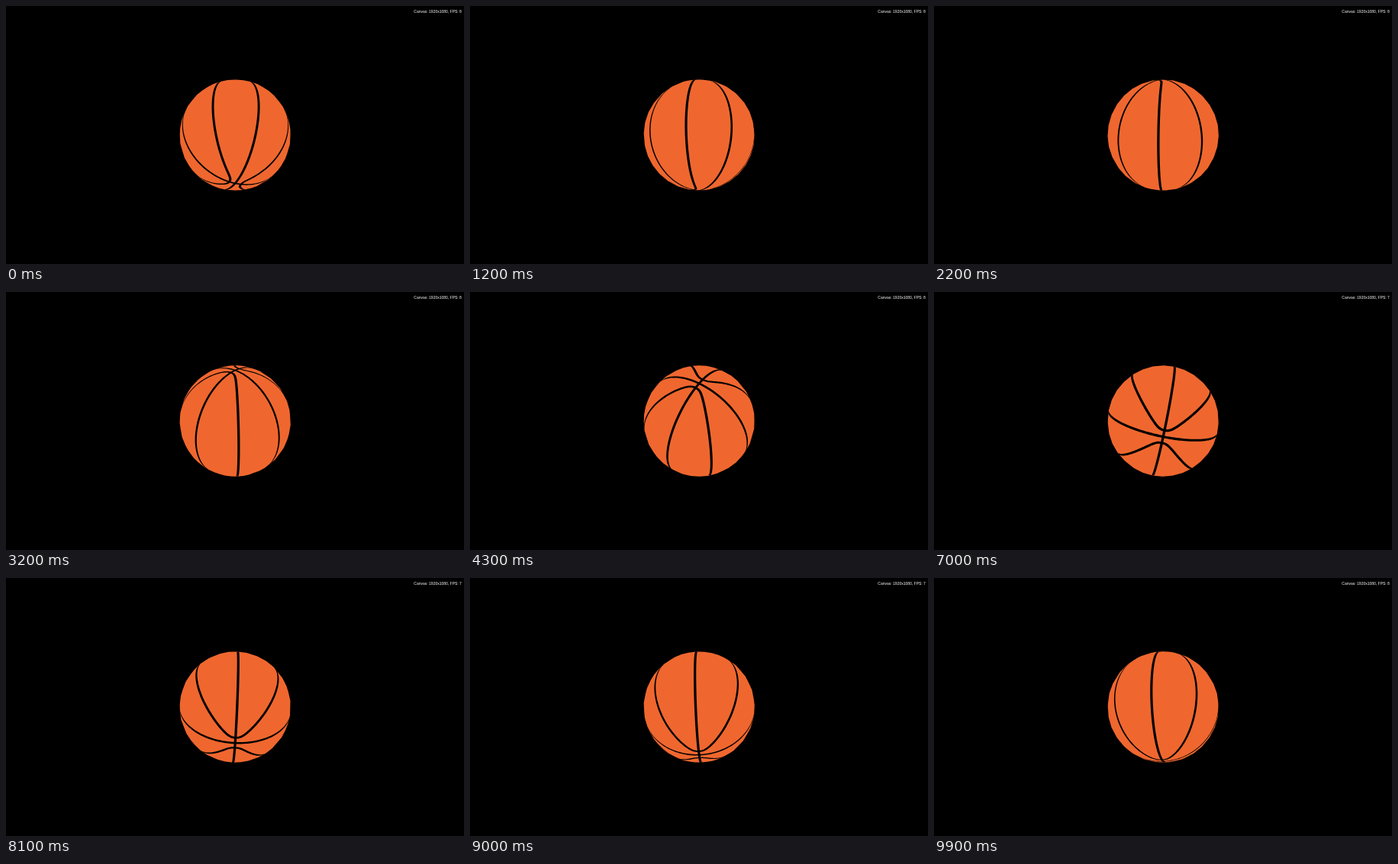
An HTML page with a canvas for the animation above (10000 ms loop, 600 by 338 pixels).

```html
<!DOCTYPE html>
<html lang="en">
<head>
<meta charset="utf-8">
<title>Basketball</title>
<style>
  html, body { margin: 0; width: 100%; height: 100%; overflow: hidden; background: #000; }
  canvas { display: block; }
</style>
</head>
<body>
<canvas id="stage" width="600" height="338"></canvas>
<script>
const ctx = document.getElementById('stage').getContext('2d');
const { PI, sin, cos, acos, min, sign, hypot } = Math;
const RAD = PI / 180;
const CX = 300.2, CY = 169, RADIUS = 72.4;
const DEPTH = 0.1;            // ball radius / camera distance
const HALF_SEAM = 0.0205;     // seam half-width on the unit sphere
const HOOK = 6.3 * RAD;       // closest approach of a looped seam to the pole
const LON = 32, LAT = 16, STEPS = 240;

let tilt, spin;

// Unit vector for polar angle and azimuth around the tilted axis (y down, z to viewer).
function onBall(polar, azimuth) {
  const c = cos(polar), s = sin(polar), f = azimuth + spin;
  const e = s * sin(f);
  return [s * cos(f), c * sin(tilt) + e * cos(tilt), c * cos(tilt) - e * sin(tilt)];
}

function project([x, y, z]) {
  const k = RADIUS / (1 - DEPTH * z);
  return [CX + x * k, CY + y * k];
}

function addQuad(...corners) {
  corners.forEach((p, i) => ctx[i ? 'lineTo' : 'moveTo'](...project(p)));
  ctx.closePath();
}

function drawBall() {
  ctx.beginPath();
  const dLat = PI / LAT, dLon = 2 * PI / LON;
  for (let i = 0; i < LAT; i++) {
    for (let j = 0; j < LON; j++) {
      const v = i * dLat, u = j * dLon;
      if (onBall(v + dLat / 2, u + dLon / 2)[2] < DEPTH) continue;
      addQuad(onBall(v, u), onBall(v + dLat, u),
              onBall(v + dLat, u + dLon), onBall(v, u + dLon));
    }
  }
  ctx.fillStyle = '#ef672f';
  ctx.fill();
}

const meridian = azimuth => s => onBall(s, azimuth);

// Follows two meridians 90 degrees apart, joined by a tight bend near each pole.
const loop = azimuth => s => {
  const polar = PI / 2 - (PI / 2 - HOOK) * cos(s);
  const ratio = min(1, HOOK / min(polar, PI - polar));
  return onBall(polar, azimuth + sign(sin(s)) * acos(ratio ** 3) / 2);
};

const seams = [meridian(0), meridian(PI / 2), loop(0), loop(PI)];

// Point on a seam with its two edges.
function section(curve, s) {
  const p = curve(s), a = curve(s - 0.002), b = curve(s + 0.002);
  const [dx, dy, dz] = b.map((v, i) => v - a[i]);
  const side = [p[1] * dz - p[2] * dy, p[2] * dx - p[0] * dz, p[0] * dy - p[1] * dx];
  const k = HALF_SEAM / hypot(...side);
  return {
    z: p[2],
    left: p.map((v, i) => v + side[i] * k),
    right: p.map((v, i) => v - side[i] * k)
  };
}

function drawSeams() {
  ctx.beginPath();
  for (const curve of seams) {
    let prev = section(curve, 0);
    for (let i = 1; i <= STEPS; i++) {
      const next = section(curve, i / STEPS * 2 * PI);
      if (next.z > DEPTH - 0.06) addQuad(prev.left, next.left, next.right, prev.right);
      prev = next;
    }
  }
  ctx.fillStyle = '#000';
  ctx.fill();
}

function drawLabel(t) {
  const fps = t >= 6.1 && t < 9.4 ? 7 : 8;
  ctx.save();
  ctx.scale(0.3125, 0.3125);
  ctx.font = '16px "Liberation Sans", Arial, sans-serif';
  ctx.textAlign = 'right';
  ctx.fillStyle = '#fff';
  ctx.fillText(`Canvas: 1920x1080, FPS: ${fps}`, 1910, 28);
  ctx.restore();
}

function draw(now) {
  const t = Math.floor(now % 10000 / 100) / 10;
  tilt = (t - 6.25) * 19.9 * RAD;
  spin = (156.8 - 7.87 * t) * RAD;
  ctx.fillStyle = '#000';
  ctx.fillRect(0, 0, 600, 338);
  drawBall();
  drawSeams();
  drawLabel(t);
}

const start = performance.now();
function tick() {
  draw(performance.now() - start);
  requestAnimationFrame(tick);
}
tick();
</script>
</body>
</html>
```
